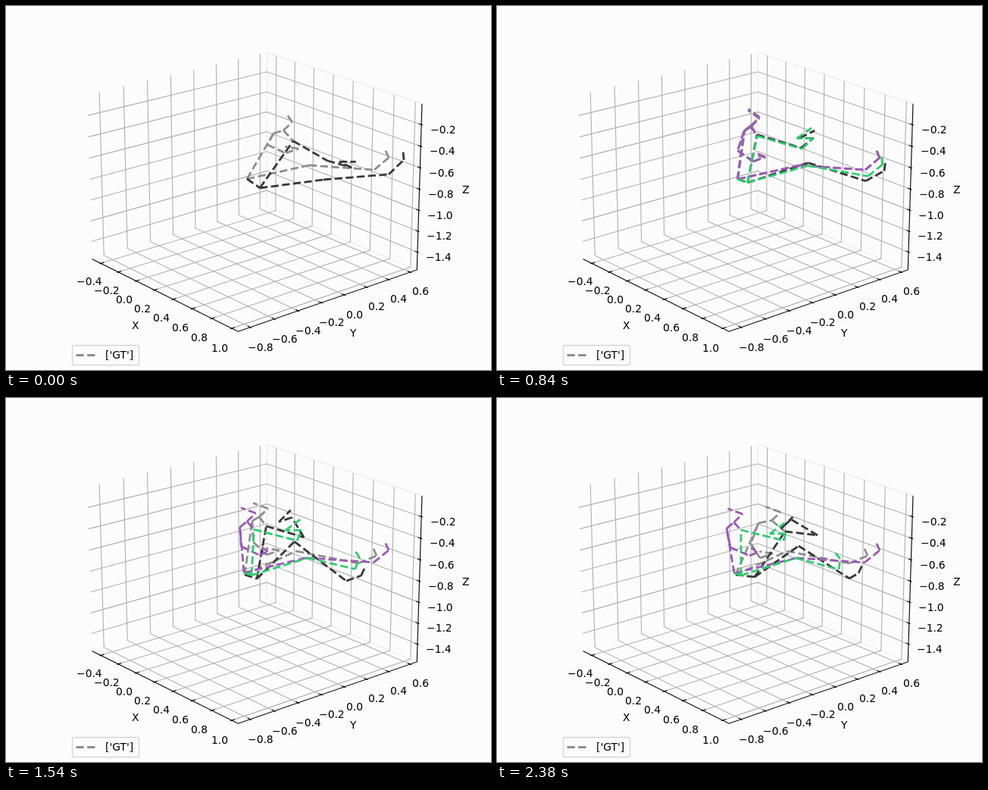
Recreate the animation shown at these times as an HTML page with a canvas. Size 640 by 480 pixels, loop 2.45 s.

```html
<!DOCTYPE html>
<html lang="en">
<head>
<meta charset="utf-8">
<title>3D pose plot</title>
<style>
  html, body { margin: 0; width: 100%; height: 100%; overflow: hidden; background: #fcfcfc; }
  canvas { display: block; }
</style>
</head>
<body>
<canvas id="stage" width="640" height="480"></canvas>
<script>
const ctx = document.getElementById("stage").getContext("2d");
const STEP = 70, STEPS = 35, LAST = STEPS - 1, FORECAST_START = 10;
const POINT = 100 / 72;
const RAD = Math.PI / 180;

// ---------- Drawing helpers ----------
function pen(color, points, dashed) {
  ctx.strokeStyle = color;
  ctx.lineWidth = points * POINT;
  ctx.setLineDash(dashed ? [3.7 * ctx.lineWidth, 1.6 * ctx.lineWidth] : []);
}

function polyline(...points) {
  ctx.beginPath();
  points.forEach(p => ctx.lineTo(...p));
  ctx.stroke();
}

function label(text, x, baseline) {
  ctx.fillText(text, Math.round(x), Math.round(baseline));
}

function centeredLabel(text, [x, y], drop) {
  label(text, x - ctx.measureText(text).width / 2, y + drop);
}

// ---------- Axes: a perspective box seen from elevation 20, azimuth -40 ----------
const DISTANCE = 10, SCALE = 480 / 0.185;
const CENTER = [80 + 0.095 * SCALE, 0.09 * SCALE];
const [sinE, cosE] = [Math.sin(20 * RAD), Math.cos(20 * RAD)];
const [sinA, cosA] = [Math.sin(-40 * RAD), Math.cos(-40 * RAD)];
const SIZE = [8 / 7, 8 / 7, 6 / 7];
const HALF = SIZE.map(s => s / 2 * 25 / 24);
const RANGE = 1.5;

function project([x, y, z]) {
  const outward = x * cosA + y * sinA;
  const depth = DISTANCE - outward * cosE - z * sinE;
  const right = y * cosA - x * sinA, up = z * cosE - outward * sinE;
  return [CENTER[0] + SCALE * right / depth, CENTER[1] - SCALE * up / depth];
}

// `edge` holds the sides the axis runs along; `wall` the two ends of each grid line.
const axes = [
  { name: "X", first: -0.4, step: 0.2, count: 8, middle: 0.28, edge: [0, -1, -1], wall: [[0, 1, -1], [0, 1, 1]], tickAxis: 1 },
  { name: "Y", first: -0.8, step: 0.2, count: 8, middle: -0.118, edge: [1, 0, -1], wall: [[-1, 0, -1], [-1, 0, 1]], tickAxis: 0 },
  { name: "Z", first: -0.2, step: -0.2, count: 7, middle: -0.79, edge: [1, 1, 0], wall: [[-1, 1, 0], [-1, -1, 0]], tickAxis: 0 },
];

// Point on the box, moved outwards by `pad` twelfths of its size.
function boxPoint(sides, pad = 0) {
  return sides.map((side, i) => side * (HALF[i] + pad * SIZE[i] / 12));
}

function forEachTick(axis, draw) {
  const along = axes.indexOf(axis);
  for (let i = 0; i < axis.count; i++) {
    const value = axis.first + i * axis.step;
    const place = (sides, pad) => {
      const p = boxPoint(sides, pad);
      p[along] = (value - axis.middle) / RANGE * SIZE[along];
      return p;
    };
    draw(value, place);
  }
}

function drawGrid(axis) {
  pen("#b0b0b0", 0.8);
  forEachTick(axis, (value, place) =>
    polyline(...[axis.edge, ...axis.wall].map(sides => project(place(sides)))));
}

function drawTicks(axis) {
  pen("#000", 0.8);
  forEachTick(axis, (value, place) => {
    const ends = [0.1, -0.2].map(length => {
      const p = place(axis.edge);
      p[axis.tickAxis] += length * axis.edge[axis.tickAxis] * SIZE[axis.tickAxis] / 12;
      return project(p);
    });
    polyline(...ends);
    const text = value.toFixed(1).replace("-0.0", "0.0").replace("-", "\u2212");
    centeredLabel(text, project(place(axis.edge, 0.8)), 10.5);
  });
  centeredLabel(axis.name, project(boxPoint(axis.edge, 1.736)), 5);
}

function drawAxes() {
  const outline = corners => polyline(...corners.map(c => project(boxPoint(c))));
  pen("#ebebeb", 0.8);
  outline([[1, 1, -1], [-1, 1, -1], [-1, 1, 1], [1, 1, 1]]);
  axes.forEach(drawGrid);
  pen("#000", 0.8);
  outline([[-1, -1, -1], [1, -1, -1], [1, 1, -1], [1, 1, 1]]);
  ctx.fillStyle = "#000";
  ctx.font = `${10 * POINT}px "DejaVu Sans", sans-serif`;
  axes.forEach(drawTicks);
}

function drawLegend() {
  pen("#d6d6d6", 1);
  ctx.fillStyle = "#fcfcfc";
  ctx.beginPath();
  ctx.roundRect(87.5, 447.5, 88, 26, 2.8);
  ctx.fill();
  ctx.stroke();
  pen("#8e8e8e", 2, true);
  polyline([92.5, 460.5], [120.3, 460.5]);
  ctx.fillStyle = "#000";
  label("['GT']", 131.4, 465);
}

// ---------- Motion ----------
const clamp = u => Math.min(1, Math.max(0, u));
const mix = (a, b, u) => a.map((v, i) => v + (b[i] - v) * u);

// Catmull-Rom curve through points spaced evenly over the loop.
function curve(...points) {
  return step => {
    const at = step / LAST * (points.length - 1);
    const i = Math.min(Math.floor(at), points.length - 2), u = at - i;
    const a = points[i], b = points[i + 1];
    const before = points[i - 1], after = points[i + 2];
    return a.map((from, n) => {
      const delta = b[n] - from;
      const m0 = before ? (b[n] - before[n]) / 2 : delta;
      const m1 = after ? (after[n] - from) / 2 : delta;
      return from + u * (m0 + u * (3 * delta - 2 * m0 - m1 + u * (m0 + m1 - 2 * delta)));
    });
  };
}

// One smooth change of stance midway through the loop.
function shift(from, to) {
  return step => {
    const u = clamp((step - 14) / 7);
    return mix(from, to, u * u * (3 - 2 * u));
  };
}

// Each joint: its true path, and where the forecast settles.
const joints = {
  rightHip: [shift([318, 228], [315, 233]), [313, 231]],
  rightKnee: [shift([400, 210], [383, 202]), [395, 211]],
  rightAnkle: [shift([486, 216], [465, 218]), [485, 217]],
  rightFoot: [shift([505, 200], [489, 208]), [505, 201]],
  rightShoulder: [curve([353, 168], [322, 162], [345, 165]), [303, 172]],
  rightElbow: [curve([345, 183], [318, 190], [327, 190], [335, 192]), [308, 197]],
  rightWrist: [curve([369, 194], [338, 205], [344, 207], [347, 211]), [333, 208]],
  leftHip: [curve([335, 240], [333, 233], [328, 235], [334, 240], [340, 236]), [322, 234]],
  leftKnee: [curve([419, 229], [412, 208], [380, 189], [398, 195]), [394, 211]],
  leftAnkle: [curve([505, 222], [504, 221], [458, 245], [449, 237], [465, 238]), [451, 226]],
  leftFoot: [curve([525, 203], [526, 204], [485, 237], [463, 230], [477, 231]), [453, 212]],
  leftShoulder: [curve([379, 178], [337, 168], [380, 176]), [322, 174]],
  leftElbow: [curve([424, 204], [412, 190], [388, 185], [401, 183], [423, 181]), [378, 188]],
  leftWrist: [curve([456, 213], [420, 176], [376, 157], [388, 160]), [381, 179]],
};

function polar([x, y], length, degrees) {
  return [x + length * Math.cos(degrees * RAD), y + length * Math.sin(degrees * RAD)];
}

function truePose(step) {
  const pose = {};
  for (const name in joints) pose[name] = joints[name][0](step);
  pose.rightPalm = polar(pose.rightWrist, 18, -19);
  pose.rightFinger = polar(pose.rightPalm, 18, -171);
  pose.leftPalm = polar(pose.leftWrist, 18, 205 - 2 * step);
  pose.leftFinger = polar(pose.leftPalm, 22, -Math.min(2.2 * step, 45));
  pose.leftToe = polar(pose.leftFoot, 12, -95 + 30 * clamp((step - 8) / 10));
  return addHead(pose, step);
}

// The forecast leaves the true pose and eases out towards its goal.
function forecastPose(step) {
  const u = (step - FORECAST_START) / (LAST - FORECAST_START);
  const eased = 1 - (1 - u) ** 2.3;
  const pose = {};
  for (const name in joints) {
    const [path, goal] = joints[name];
    pose[name] = mix(path(FORECAST_START), goal, eased);
  }
  pose.leftWrist[1] -= 6 * Math.sin(Math.PI * Math.sqrt(u));
  pose.rightPalm = polar(pose.rightWrist, 17 - 6 * eased, -22);
  pose.rightFinger = polar(pose.rightPalm, 15 - 4 * eased, -160 + 20 * eased);
  pose.leftPalm = polar(pose.leftWrist, 21, 180);
  pose.leftFinger = polar(pose.leftPalm, 24, -36);
  pose.leftToe = polar(pose.leftFoot, 10, -90 - 40 * eased);
  return addHead(pose, step);
}

function addHead(pose, step) {
  const [x, y] = mix(pose.rightShoulder, pose.leftShoulder, 0.5);
  pose.neck = [x, y - 9];
  pose.chin = polar(pose.neck, 16, -43);
  pose.crown = polar(pose.chin, 12 + 9 * clamp(step / 16), -125 - 35 * clamp(step / 22));
  pose.rightToe = polar(pose.rightFoot, 10, -114);
  return pose;
}

// ---------- Skeleton ----------
const chain = (side, ...parts) => parts.map(part => side + part);
const leg = side => chain(side, "Hip", "Knee", "Ankle", "Foot", "Toe");
const arm = side => chain(side, "Shoulder", "Elbow", "Wrist", "Palm", "Finger");

function drawSkeleton(pose, rightColor, leftColor) {
  const bones = (color, names) => {
    pen(color, 2, true);
    for (let i = 1; i < names.length; i++) polyline(pose[names[i - 1]], pose[names[i]]);
  };
  bones(rightColor, leg("right"));
  bones(rightColor, ["rightHip", ...arm("right")]);
  bones(leftColor, ["rightHip", ...leg("left")]);
  bones(rightColor, ["neck", "chin", "crown"]);
  bones(rightColor, ["rightShoulder", "neck", "leftShoulder"]);
  bones(leftColor, ["leftHip", ...arm("left")]);
}

function render() {
  const step = Math.floor(performance.now() / STEP) % STEPS;
  ctx.fillStyle = "#fcfcfc";
  ctx.fillRect(0, 0, 640, 480);
  drawAxes();
  drawSkeleton(truePose(step), "#8e8e8e", "#383838");
  if (step >= FORECAST_START) drawSkeleton(forecastPose(step), "#9b59b6", "#2ecc71");
  drawLegend();
  requestAnimationFrame(render);
}

render();
</script>
</body>
</html>
```
